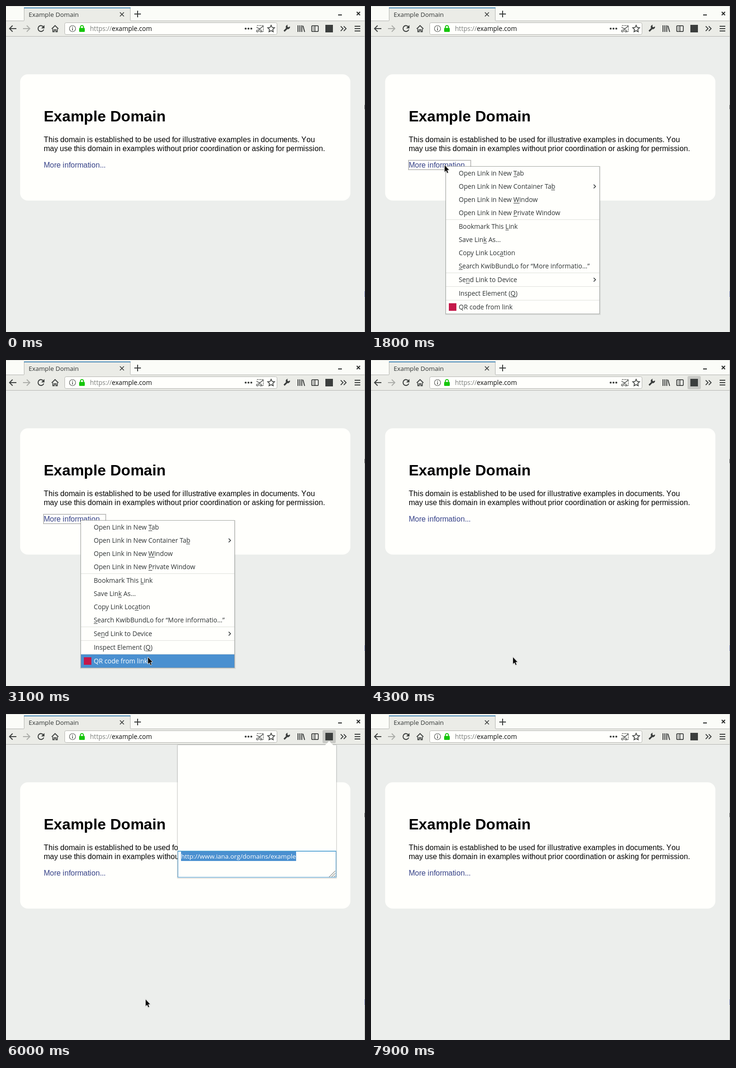
Write an HTML page with a canvas that moves like this. It is 761 px wide and 692 px high and loops after 9 s.

```html
<!DOCTYPE html>
<html lang="en">
<head>
<meta charset="utf-8">
<title>Link menu demo</title>
<style>
  html, body { margin: 0; width: 100%; height: 100%; overflow: hidden; background: #eceeec; }
  canvas { display: block; width: 761px; height: 692px; }
</style>
</head>
<body>
<canvas id="stage"></canvas>
<script>
const W = 761, H = 692, LOOP = 9000, STEP = 100;
const UI = '"Open Sans", "Noto Sans", sans-serif';
const PAGE = '"Liberation Sans", Arial, sans-serif';
const INK = '#3b3e3d', PAPER = '#fffffc', CHROME = '#ebece7', EDGE = '#b3b4b0', BLUE = '#4a90d0';

const canvas = document.getElementById('stage');
const g = canvas.getContext('2d');
const ratio = window.devicePixelRatio || 1;
canvas.width = W * ratio;
canvas.height = H * ratio;

// Pointer strokes: first tick, then one position per tick; the last one holds.
const strokes = [
  [6, [[61, 35], [66, 62], [77, 108], [95, 165], [115, 225], [133, 276], [148, 315], [156, 338]]],
  [24, [[185, 378], [217, 432], [243, 476], [267, 530], [283, 579]]],
  [30, [[294, 610], [301, 631]]],
  [60, [[296, 606], [281, 553], [262, 484], [243, 419], [229, 372], [224, 356]]],
  [67, [[171, 262], [129, 172], [105, 112], [97, 80], [93, 56], [91, 34], [91, 14]]]
];
const HIDE = 74;

const items = [
  ['Open Link in New &Tab', 355],
  ['Open Link in New Container Ta&b', 383, true],
  ['Open Link in New &Window', 411],
  ['Open Link in New &Private Window', 439],
  ['Bookmark This &Link', 468],
  ['Save Lin&k As...', 496],
  ['Copy Link Loc&ation', 524],
  ['&Search KwibBundLo for “More informatio...”', 552],
  ['Se&nd Link to Device', 581, true],
  ['Inspect Element (&Q)', 610],
  ['QR code from link', 639]
];

function rect(x, y, w, h, color) {
  g.fillStyle = color;
  g.fillRect(x, y, w, h);
}

function round(x, y, w, h, r, fill, stroke) {
  g.beginPath();
  g.roundRect(x, y, w, h, r);
  if (fill) { g.fillStyle = fill; g.fill(); }
  if (stroke) { g.strokeStyle = stroke; g.lineWidth = 1; g.stroke(); }
}

function text(str, x, y, font, color) {
  g.font = font;
  g.fillStyle = color;
  g.fillText(str, x, y);
}

// Hinted page text: every advance falls on a whole pixel.
function pageText(str, x, y, font, color) {
  g.font = font;
  g.fillStyle = color;
  for (const ch of str) {
    g.fillText(ch, x, y);
    x += Math.round(g.measureText(ch).width);
  }
}

function path(d, color = INK, width = 2) {
  g.strokeStyle = color;
  g.lineWidth = width;
  g.stroke(new Path2D(d));
}

function solid(d, color = INK) {
  g.fillStyle = color;
  g.fill(new Path2D(d));
}

function disc(x, y, r, color = INK) {
  g.beginPath();
  g.arc(x, y, r, 0, 7);
  g.fillStyle = color;
  g.fill();
}

function titleBar() {
  rect(0, 0, W, 32, '#fbfcf8');
  rect(0, 0, W, 1, '#d8d9d5');
  rect(0, 31, W, 1, EDGE);
  rect(38, 3, 226, 29, CHROME);
  rect(38, 3, 1, 28, EDGE);
  rect(263, 3, 1, 28, EDGE);
  rect(38, 3, 226, 2, '#4788b5');
  text('Example Domain', 48, 23, `13.4px ${UI}`, '#303433');
  path('M241.5 13.5l8.5 8.5M250 13.5l-8.5 8.5', INK, 1.7);
  path('M272 17h14M279 10v14', INK, 2);
  rect(704, 18, 8, 2, '#252827');
  path('M743.5 12.5l7 7M750.5 12.5l-7 7', '#252827', 2);
}

function scissors() {
  g.setLineDash([2, 1.5]);
  path('M532 41.5h13.5v13h-4', INK, 1.3);
  g.setLineDash([]);
  path('M546 42l-11 9M531 45l8 4.5', INK, 1.4);
  path('M531 53a2 2 0 1 0 4 0a2 2 0 1 0-4 0M538 53a2 2 0 1 0 4 0a2 2 0 1 0-4 0', INK, 1.2);
}

function toolBar(pressed) {
  rect(0, 32, W, 32, CHROME);
  rect(0, 64, W, 1, EDGE);

  path('M7.5 48H22M14 41.5L7.5 48l6.5 6.5');
  path('M36 48h14.5M44 41.5l6.5 6.5l-6.5 6.5', '#abaca8');
  path('M79.3 44.3A6.2 6.2 0 1 0 80 50');
  solid('M81.5 40.5v7h-7z');
  path('M97 48.5l7-7l7 7', INK, 1.9);
  path('M99.3 48.5v6h3v-4h3.4v4h3v-6', INK, 1.8);

  round(124.5, 35.5, 450, 25, 3, PAPER, EDGE);
  path('M134.5 48a6.5 6.5 0 1 0 13 0a6.5 6.5 0 1 0-13 0', '#555856', 1.2);
  rect(140.2, 47, 1.6, 5, '#555856');
  rect(140.2, 44, 1.6, 1.7, '#555856');
  path('M157.7 47v-2.3a3.3 3.3 0 0 1 6.6 0V47', '#16c60c', 2);
  round(155, 46.5, 12, 8.5, 1.5, '#16c60c');
  const font = `13.6px ${UI}`;
  text('https://', 178, 53, font, '#7b7e7c');
  text('example.com', 178 + g.measureText('https://').width, 53, font, '#0c0d0d');
  for (const x of [508, 514, 520]) disc(x, 48, 2.1);
  scissors();
  path('M562 40.8l2.2 4.8l5.1.6l-3.8 3.5l1 5.1l-4.5-2.6l-4.5 2.6l1-5.1l-3.8-3.5l5.1-.6z', INK, 1.6);

  path('M589.5 53.5l6-6', INK, 3.2);
  solid('M602 43.5a4.6 4.6 0 1 1-4.6-3.5l-1.2 3l2.2 2.2z');
  path('M619 41v14M623 41v14M627 41v14M629.5 42l3.5 13', INK, 2);
  g.lineWidth = 1.7;
  g.strokeStyle = INK;
  g.beginPath();
  g.roundRect(648, 41.8, 14, 12.4, 2);
  g.stroke();
  rect(654, 42, 1.6, 12, INK);
  path('M650 45h3M650 48h3M650 51h3', INK, 1);
  if (pressed) round(671, 34, 28, 28, 3, '#c8c9c5');
  rect(677, 40, 16, 16, INK);
  path('M709.5 43l5 5l-5 5M716 43l5 5l-5 5', INK, 1.8);
  path('M739 43h12M739 48h12M739 53h12', INK, 2);
}

function page(focused) {
  rect(0, 65, W, H - 65, '#eceeec');
  round(30, 145, 700, 268, 16, PAPER);
  pageText('Example Domain', 80, 245, `bold 32px ${PAGE}`, '#000');
  const font = `16px ${PAGE}`;
  pageText('This domain is established to be used for illustrative examples in documents. You', 80, 289, font, '#000');
  pageText('may use this domain in examples without prior coordination or asking for permission.', 80, 308, font, '#000');
  pageText('More information...', 80, 343, font, '#38448a');
  if (focused) {
    g.setLineDash([1, 1]);
    path('M79 327.5h133M79 347.5h133M79.5 327v21M211.5 327v21', '#222', 1);
    g.setLineDash([]);
  }
}

function windowEdge() {
  rect(760, 0, 1, H, '#b2b4b1');
  rect(760, 210, 1, 9, '#444');
  for (let y = 606; y < 616; y += 3) rect(760, y, 1, 2, '#4450a0');
}

function menu(active) {
  rect(157, 340, 330, 316, 'rgba(0,0,0,.07)');
  rect(158, 340, 327, 314, '#a3a6a2');
  rect(159, 341, 325, 312, PAPER);
  for (const y of [453, 566, 595, 624]) rect(159, y, 325, 1, '#dfe0dc');
  items.forEach(([label, y, sub], i) => {
    const on = i === active, color = on ? '#fff' : '#2e3334';
    if (on) rect(159, y - 14, 325, 28, BLUE);
    const at = label.indexOf('&'), plain = label.replace('&', '');
    text(plain, 186, y + 5, `13.7px ${UI}`, color);
    if (at >= 0) {
      const x = 186 + g.measureText(plain.slice(0, at)).width;
      rect(Math.round(x), y + 7, Math.round(g.measureText(plain[at]).width), 1, color);
    }
    if (sub) path(`M472 ${y - 4}l4 4l-4 4`, color, 1.6);
  });
  rect(165, 631, 16, 16, '#c4184a');
}

function popup(alpha) {
  g.globalAlpha = alpha;
  round(362, 65, 340, 285, 2, 'rgba(0,0,0,.06)');
  round(363, 65, 338, 284, 2, 'rgba(0,0,0,.13)');
  rect(364, 66, 336, 282, PAPER);
  solid('M676 66.5l9-9l9 9z', PAPER);
  rect(364, 290, 336, 1, '#8cc6e6');
  rect(364, 291, 336, 56, '#3b92cc');
  rect(365, 292, 334, 54, PAPER);
  const url = 'http://www.iana.org/domains/example';
  g.font = `13.5px ${UI}`;
  rect(371, 292, Math.round(g.measureText(url).width), 20, BLUE);
  text(url, 371, 307, g.font, '#fff');
  path('M685 346l13-13M690 346l8-8M695 346l3-3', '#969895', 1.3);
  g.globalAlpha = 1;
}

function outlined(d) {
  const shape = new Path2D(d);
  g.lineJoin = 'round';
  g.lineWidth = 3;
  g.strokeStyle = 'rgba(0,0,0,.12)';
  g.stroke(shape);
  g.lineWidth = 1.6;
  g.strokeStyle = '#fff';
  g.stroke(shape);
  g.fillStyle = '#0b0b0b';
  g.fill(shape);
  g.lineJoin = 'miter';
}

function pointer(tick) {
  const stroke = strokes.filter(s => s[0] <= tick).pop();
  if (!stroke || tick >= HIDE) return;
  const [start, points] = stroke;
  const [x, y] = points[Math.min(tick - start, points.length - 1)];
  g.save();
  g.translate(x, y);
  if (tick >= 13 && tick < 18) {
    outlined('M-1 1a1.5 1.5 0 0 1 3 0v5l9 1.5q2 .5 1.5 2.5l-1.5 5H2l-5-6q0-2 2-1z');
  } else {
    outlined('M0 0V14L3.2 11.2L5.6 16.5L7.6 15.6L5.3 10.4L9.4 10z');
  }
  g.restore();
}

function activeItem(tick) {
  if (tick >= 31) return 10;
  if (tick >= 30) return 9;
  if (tick >= 28) return 8;
  return [-1, 1, 3, 4][tick - 24] ?? -1;
}

function draw(tick) {
  g.setTransform(ratio, 0, 0, ratio, 0, 0);
  const open = tick >= 18 && tick < 43;
  const panel = tick >= 44 && tick < 79;
  titleBar();
  page(open);
  toolBar(tick >= 43 && tick < 79);
  windowEdge();
  if (open) menu(activeItem(tick));
  if (panel) popup(Math.min(1, (tick - 43) * .4));
  pointer(tick);
}

let shown = -1;
const began = performance.now();
function frame(now) {
  const tick = Math.floor((Math.max(0, now - began) % LOOP) / STEP);
  if (tick !== shown) draw(shown = tick);
  requestAnimationFrame(frame);
}
frame(began);
</script>
</body>
</html>
```
